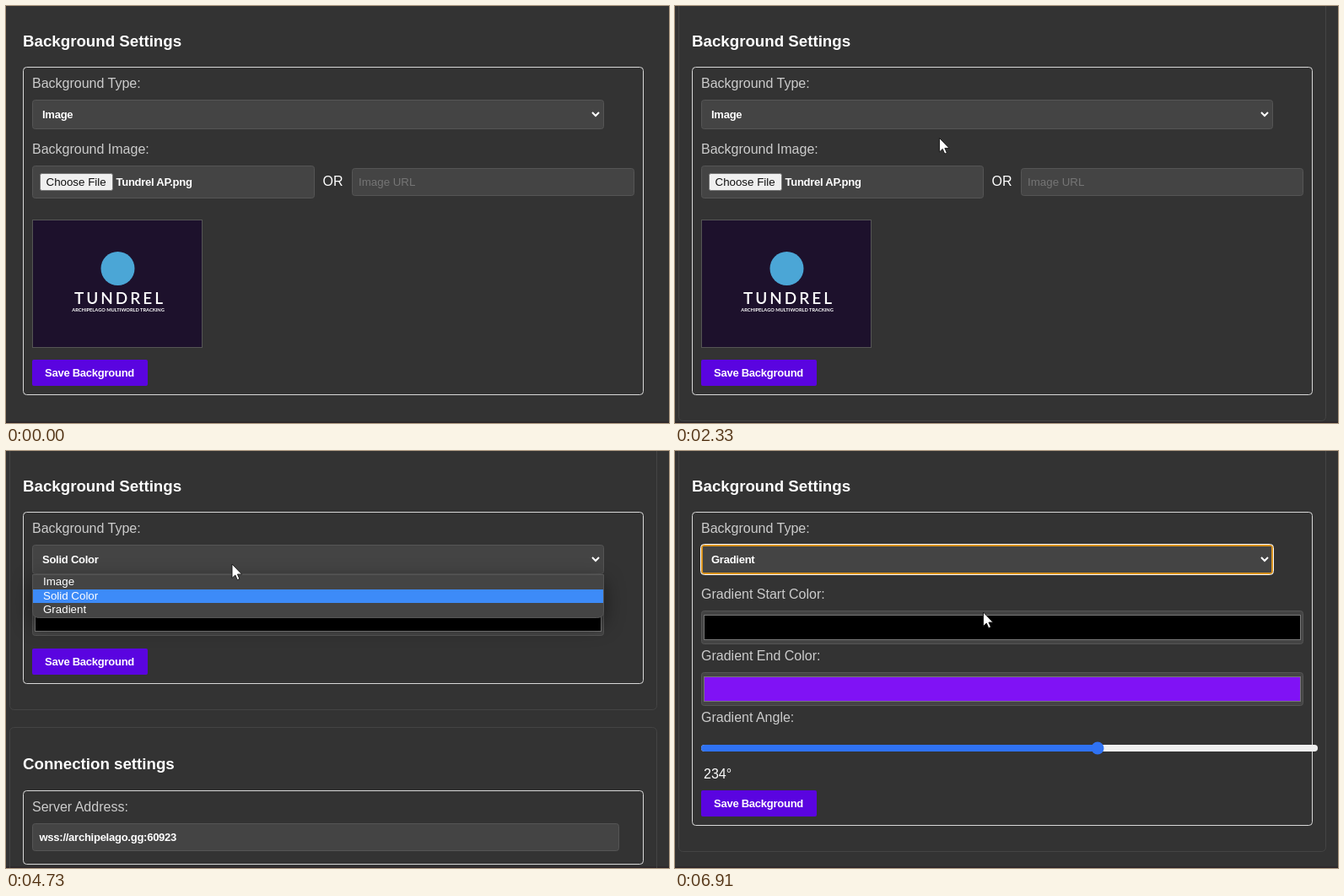
These frames come from a looping animation (786 px wide and 494 px high, 6.94 s). An HTML page:

```html
<!DOCTYPE html>
<html lang="en">
<head>
<meta charset="utf-8">
<title>Background settings</title>
<style>
  html, body { margin: 0; width: 100%; height: 100%; overflow: hidden; background: #333; }
  svg { display: block; width: 786px; height: 494px; font: 13.333px "Liberation Sans", Arial, sans-serif; }
  text { fill: #fff; white-space: pre; }
  .title { font-size: 18.72px; font-weight: bold; }
  .label { font-size: 16px; fill: #ccc; }
  .big { font-size: 16px; }
  .bold { font-size: 13px; font-weight: bold; letter-spacing: -.25px; }
  .hint { fill: #757575; }
  .dark { fill: #111; }
  .card { fill: none; stroke: #444; }
  .group { fill: none; stroke: #d8d8d8; }
  .field { fill: #444; stroke: #555; }
  .swatch { stroke: #777; }
  .word { font: 600 19px Lato, sans-serif; letter-spacing: 3px; text-anchor: middle; }
  .tag { font: bold 5.7px Lato, sans-serif; text-anchor: middle; }
  #menu { filter: drop-shadow(0 8px 12px #0007); }
</style>
</head>
<body>
<svg id="stage" viewBox="0 0 786 494"></svg>
<script>
const LOOP = 6940;
const stage = document.getElementById('stage');

// Boxes are given by their outer edges; the 1px stroke lies inside.
const box = (cls, x1, y1, x2, y2, r = 3, extra = '') =>
  `<rect class="${cls}" x="${x1 + .5}" y="${y1 + .5}" width="${x2 - x1 - 1}" height="${y2 - y1 - 1}" rx="${r}" ${extra}/>`;
const text = (cls, x, y, s) => `<text class="${cls}" x="${x}" y="${y}">${s}</text>`;
const swatch = (x1, y1, x2, y2, color) =>
  box('field', x1, y1, x2, y2) + box('swatch', x1 + 3, y1 + 5, x2 - 3, y2 - 5, 0, `fill="${color}"`);
const saveButton = y =>
  `<rect x="31" y="${y}" width="137" height="31" rx="2" fill="#5a04e0"/>` +
  text('bold', 46, y + 20, 'Save Background');
const frame = (groupEnd, cardEnd) =>
  `<g class="outline">${box('card', 4, -20, 772, cardEnd, 5)}</g>` + box('group', 20, 72, 756, groupEnd, 4);

const panes = {
  Image: frame(461, 492) +
    text('label', 31, 175, 'Background Image:') +
    box('field', 31, 189, 366, 228) +
    box('', 40, 198, 127, 219, 2, 'fill="#efefef" stroke="#767676"') +
    text('dark', 47.5, 213, 'Choose File') +
    text('bold', 130.5, 213, 'Tundrel AP.png') +
    text('big', 375.5, 213, 'OR') +
    box('field', 410, 192, 745, 225) +
    text('hint', 418, 213, 'Image URL') +
    box('', 31, 253, 233, 405, 0, 'fill="#1d112c" stroke="#555"') +
    '<circle cx="132.5" cy="311" r="20" fill="#4ba6d6"/>' +
    text('word', 135, 353, 'TUNDREL') +
    text('tag', 133, 362, 'ARCHIPELAGO MULTIWORLD TRACKING') +
    saveButton(419),
  'Solid Color': frame(276, 307) +
    text('label', 31, 175, 'Background Color:') +
    swatch(31, 189, 709, 219, '#000') +
    saveButton(234) +
    box('card', 4, 327, 772, 520, 5) +
    text('title', 20, 377, 'Connection settings') +
    box('group', 20, 402, 756, 490, 4) +
    text('label', 31, 427, 'Server Address:') +
    box('field', 31, 441, 727, 474) +
    text('bold', 39.5, 462, 'wss://archipelago.gg:60923'),
  Gradient: frame(444, 475) +
    text('label', 31, 175, 'Gradient Start Color:') +
    swatch(31, 189, 745, 229, '#000') +
    text('label', 31, 248, 'Gradient End Color:') +
    swatch(31, 262, 745, 302, '#8012f5') +
    text('label', 31, 321, 'Gradient Angle:') +
    '<rect x="31" y="348" width="731" height="8" rx="4" fill="#efefef"/>' +
    '<rect x="31" y="348" width="470" height="8" rx="4" fill="#2f72f3"/>' +
    '<circle cx="501" cy="352" r="7.5" fill="#2f72f3"/>' +
    text('big', 34, 388, '234°') +
    saveButton(402)
};
const names = Object.keys(panes);

stage.innerHTML =
  '<rect width="786" height="494" fill="#333"/>' +
  '<rect y="492.5" width="786" height="2" fill="#2b2529"/>' +
  names.map(n => `<g class="pane">${panes[n]}</g>`).join('') +
  text('title', 20, 47.5, 'Background Settings') +
  text('label', 31, 97, 'Background Type:') +
  box('field', 31, 111, 709, 146) +
  `<g id="ring" fill="none">
    <rect x="32" y="112" width="676" height="33" rx="2" stroke="#d8921e" stroke-width="2"/>
    <rect x="30.5" y="110.5" width="679" height="36" rx="4" stroke="#fff"/>
  </g>
  <text id="choice" class="bold" x="43" y="133"></text>
  <path d="M695 126l4 4 4-4" fill="none" stroke="#fff" stroke-width="2"/>
  <g id="menu">
    <path d="M31.5 146.5H708.5V190q0 7.500-8 7.500H39.500q-8 0-8-7.500Z" fill="#444" stroke="#555"/>
    <path id="hover" fill="#3d8bf8"/>` +
    names.map((n, i) => text('', 44, [159, 176, 192][i], n)).join('') +
  `</g>
  <path id="cursor" d="M0 0V16.500L3.800 13 6.300 18.700 8.900 17.500 6.400 12H11.600Z" fill="#fff" stroke="#111" stroke-width=".9"/>`;

const [ring, choice, menu, hover, cursor] =
  ['ring', 'choice', 'menu', 'hover', 'cursor'].map(id => document.getElementById(id));
const paneNodes = stage.querySelectorAll('.pane');
const outlines = stage.querySelectorAll('.outline');
const rows = [
  'M32 147H708V164H32Z',
  'M32 164H708V180H32Z',
  'M32 180H708V190q0 7-8 7H40q-8 0-8-7Z'
];

// Pointer path: time, x, y
const path = [
  [1240, 779, 440], [1560, 610, 350], [1910, 436, 253], [2330, 313.5, 156.500],
  [2640, 298, 136], [2950, 296, 135], [3330, 287, 165], [3420, 285.500, 167.500],
  [3970, 285.500, 167.500], [4300, 272.500, 142], [4610, 268, 134], [4760, 268, 134],
  [5270, 270.500, 185.500], [5910, 270.500, 185.500], [6850, 365.500, 191]
];

function pointAt(t) {
  const i = path.findIndex(p => p[0] > t);
  if (i < 0) return path[path.length - 1].slice(1);
  const [t0, x0, y0] = path[i - 1], [t1, x1, y1] = path[i];
  const k = (t - t0) / (t1 - t0);
  return [x0 + (x1 - x0) * k, y0 + (y1 - y0) * k];
}

const show = (node, on) => node.setAttribute('visibility', on ? 'visible' : 'hidden');

function draw(t) {
  const mode = t < 3580 ? 0 : t < 5580 ? 1 : 2;
  const open = t >= 2950 && t < 3580 || t >= 4700 && t < 5580;
  paneNodes.forEach((p, i) => p.style.display = i === mode ? '' : 'none');
  outlines.forEach(o => show(o, t >= 30));
  choice.textContent = names[mode];
  show(ring, mode && !open);
  show(menu, open);
  show(cursor, t >= 1240);
  if (t < 1240) return;
  const [x, y] = pointAt(t);
  cursor.setAttribute('transform', `translate(${x} ${y})`);
  hover.setAttribute('d', rows[y < 147 ? mode : y < 164 ? 0 : y < 180 ? 1 : 2]);
}

const start = performance.now();
function tick() {
  draw((performance.now() - start) % LOOP);
  requestAnimationFrame(tick);
}
tick();
</script>
</body>
</html>
```
